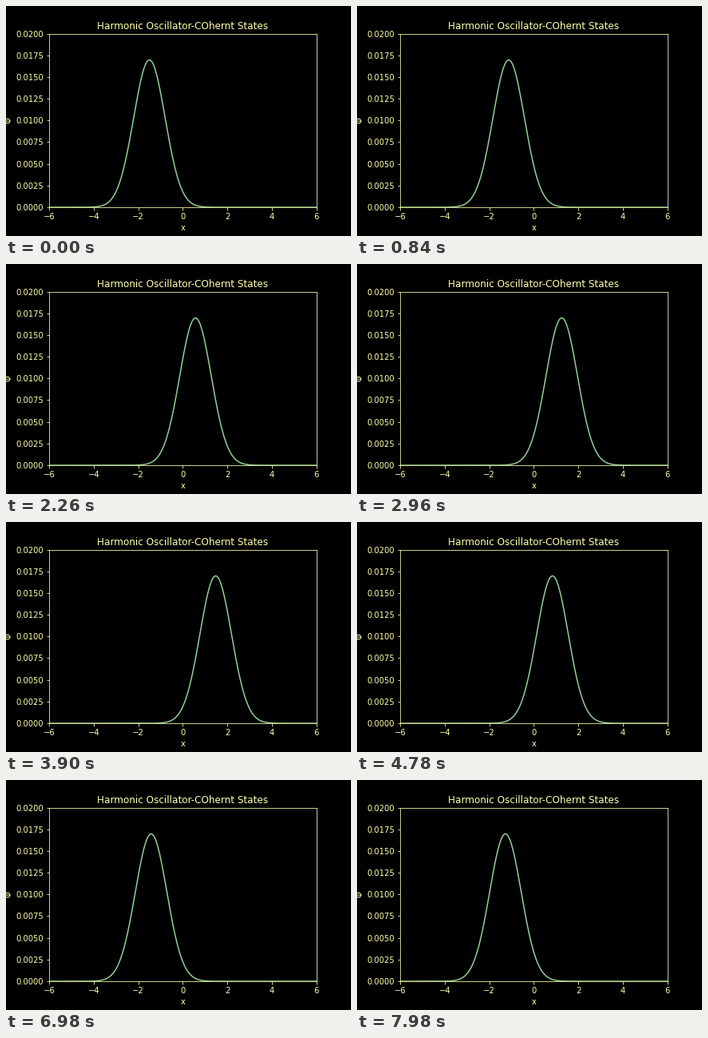
A matplotlib script for the animation above (8 s loop, 432 px wide and 288 px high).

```python
import numpy as np
import matplotlib.pyplot as plt
from matplotlib.animation import FuncAnimation

INK = "#ffffaa"
LINE = "#94d296"
STEP = 20            # ms per tick
LOOP = 8000          # ms

plt.rcParams.update({
    "font.family": "DejaVu Sans",
    "font.size": 10,
    "text.color": INK,
    "axes.labelcolor": INK,
    "axes.edgecolor": INK,
    "xtick.color": INK,
    "ytick.color": INK,
})

fig, ax = plt.subplots(figsize=(6, 4), dpi=72, facecolor="black")
fig.subplots_adjust(left=0.125, right=0.9, bottom=0.125, top=0.88)
ax.set_facecolor("black")
ax.set_xlim(-6, 6)
ax.set_ylim(0, 0.02)
ax.set_title("Harmonic Oscillator-COhernt States")
ax.set_xlabel("x")
ax.set_ylabel("Φ")
ax.spines["right"].set_color("#f4f4f4")

x = np.linspace(-6, 6, 400)
curve, = ax.plot([], [], color=LINE, lw=1.5)


def state_index(t):
    """Three states every 140 ms, held for 20, 100 and 20 ms."""
    cycle, rest = divmod(t, 140)
    return 3 * cycle + (rest >= 20) + (rest >= 120)


def density(n):
    center = -1.5 * np.cos(0.04 * n)
    p = np.exp(-(x - center) ** 2)
    return p / p.sum()


def update(frame):
    curve.set_data(x, density(state_index(frame * STEP)))
    return curve,


def init():
    return update(0)


anim = FuncAnimation(fig, update, frames=LOOP // STEP, init_func=init,
                     interval=STEP, repeat=True, repeat_delay=0, blit=True)
plt.show()
```
